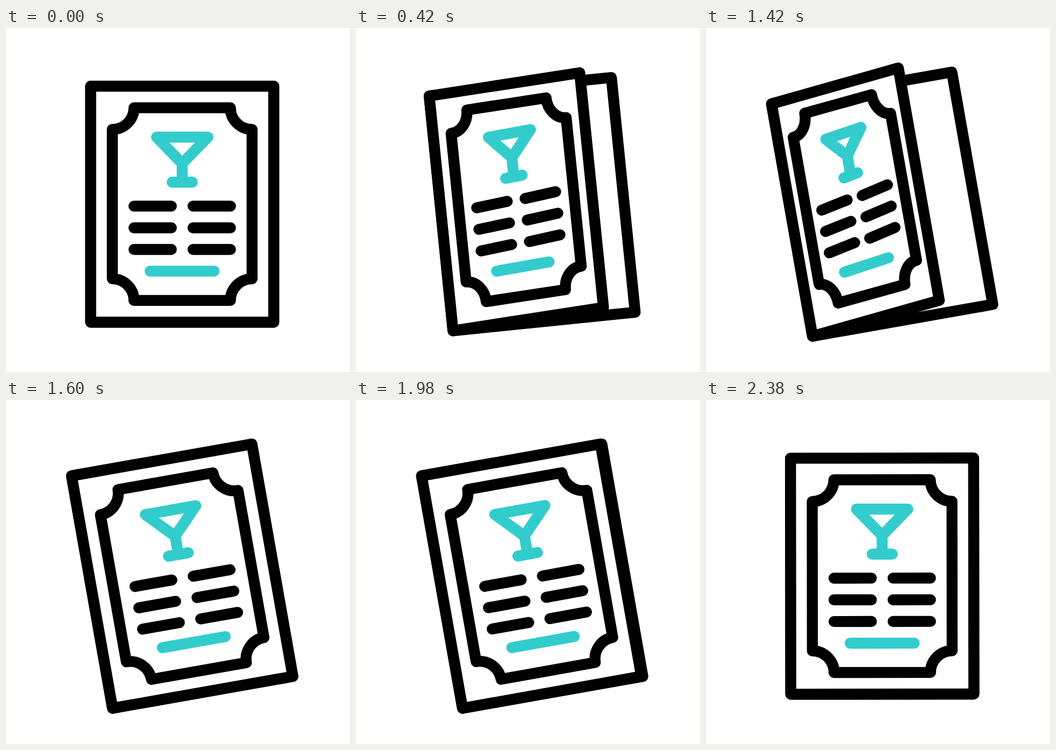
Write an HTML page that moves like this. It is 640 by 640 pixels and loops after 2400 ms.

```html
<!DOCTYPE html>
<html lang="en">
<head>
<meta charset="utf-8">
<title>Folding menu card</title>
<style>
  html, body { margin: 0; width: 100%; height: 100%; overflow: hidden; background: #fff; }
  svg { display: block; width: 100vw; height: 100vh; }
  path { fill: none; stroke: #000; stroke-width: 20.4; stroke-linecap: round; stroke-linejoin: round; }
  .paper { fill: #fff; }
  .teal { stroke: #3cc; }
</style>
</head>
<body>
<svg viewBox="0 0 640 640">
  <g id="card">
    <path class="paper" d="M157.5 108.2H498.1V547.2H157.5Z"/>
    <path class="paper" id="cover"/>
    <path id="frame"/>
    <path id="rows"/>
    <path class="teal" id="glass"/>
    <path class="teal" id="footer"/>
  </g>
</svg>
<script>
const LOOP = 2400, TILT = -10, SPINE = 157.5, SQUEEZE = 0.293;
const $ = id => document.getElementById(id);

// [time, value] keys, eased between neighbours
const foldKeys = [[0, 0], [200, 0], [600, 1], [1400, 1], [1600, 0], [1800, 1], [2000, 0], [LOOP, 0]];
const tiltKeys = [[0, 0], [200, 0], [600, 1], [2000, 1], [LOOP, 0]];

function sample(keys, t) {
  const i = keys.findIndex(k => k[0] > t);
  const [t0, a] = keys[i - 1], [t1, b] = keys[i];
  const u = (t - t0) / (t1 - t0);
  return a + (b - a) * u * u * (3 - 2 * u);
}

function draw(t) {
  const fold = sample(foldKeys, t);
  // A point moves toward the spine and rises by its own lift as the cover opens
  const pt = (x, y, lift) =>
    (SPINE + (x - SPINE) * (1 - SQUEEZE * fold)).toFixed(2) + ' ' + (y - lift * fold).toFixed(2);
  const line = (...pts) => 'M' + pts.map(p => pt(...p)).join('L');

  const near = 12.6, far = 25.5;
  const L = 197.8, R = 457.8, T = 148.4, B = 506.9, r = 40.3, h = r * 0.552;
  const l = (x, y) => pt(x, y, near), f = (x, y) => pt(x, y, far);

  $('cover').setAttribute('d',
    line([SPINE, 108.2, 0], [498.1, 108.2, far], [498.1, 547.2, far], [SPINE, 547.2, 0]) + 'Z');

  $('frame').setAttribute('d',
    `M${l(L, T + r)}C${l(L + h, T + r)} ${l(L + r, T + h)} ${l(L + r, T)}` +
    `L${f(R - r, T)}C${f(R - r, T + h)} ${f(R - h, T + r)} ${f(R, T + r)}` +
    `L${f(R, B - r)}C${f(R - h, B - r)} ${f(R - r, B - h)} ${f(R - r, B)}` +
    `L${l(L + r, B)}C${l(L + r, B - h)} ${l(L + h, B - r)} ${l(L, B - r)}Z`);

  $('rows').setAttribute('d', [331.4, 371.7, 412].map(y =>
    line([238.1, y, near], [307.6, y, 23.4]) +
    line([348, y, 26.8], [417.6, y, 38.7])).join(''));

  $('glass').setAttribute('d',
    line([280.1, 203, near], [375.6, 203, 23.6], [327.8, 252.2, 25]) + 'Z' +
    line([327.8, 252.2, 25], [327.8, 286.8, 22.8]) +
    line([309.2, 286.8, 20.2], [346.6, 286.8, 25.4]));

  $('footer').setAttribute('d', line([268.2, 452.4, near], [387.2, 452.4, 25.3]));

  $('card').setAttribute('transform', `rotate(${TILT * sample(tiltKeys, t)} 327.8 327.8)`);
}

function tick() {
  draw(performance.now() % LOOP);
  requestAnimationFrame(tick);
}
tick();
</script>
</body>
</html>
```
